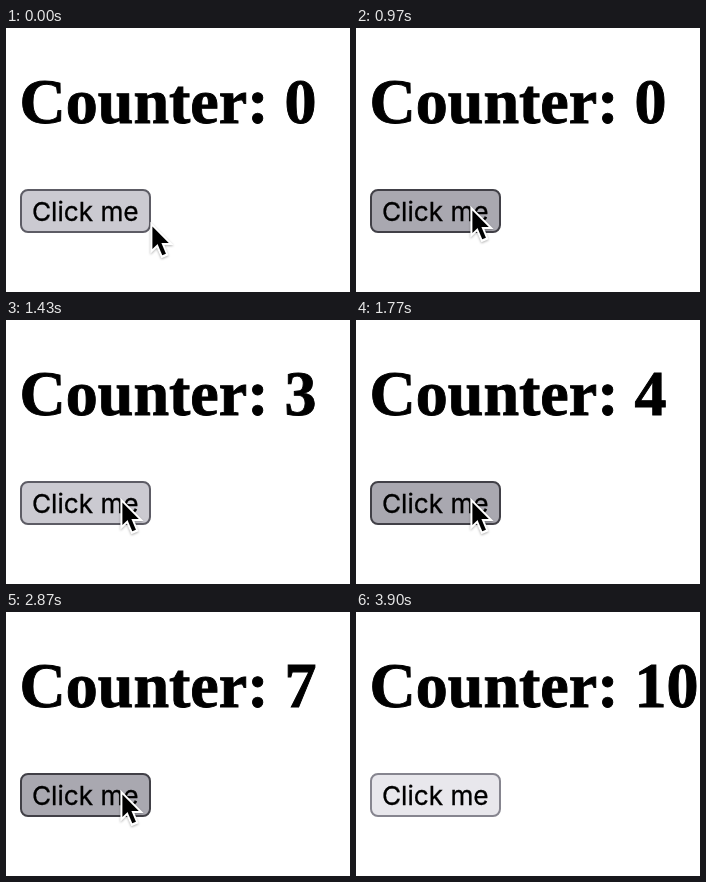
An HTML page for the animation above (4360 ms loop, 344 px wide and 264 px high).

```html
<!DOCTYPE html>
<html lang="en">
<head>
<meta charset="utf-8">
<title>Counter</title>
<style>
  html, body { margin: 0; width: 100%; height: 100%; overflow: hidden; background: #fff; }
  svg { display: block; width: 344px; height: 264px; }
  #title {
    font: bold 64px "Liberation Serif", Times, serif;
    white-space: pre;
    stroke: #000;
    stroke-width: .9px;
  }
  #label {
    font: 400 26.2px Inter, sans-serif;
    stroke: #000;
    stroke-width: .3px;
  }
</style>
</head>
<body>
<svg viewBox="0 0 344 264">
  <text id="title" x="13.6" y="95">Counter: 0</text>
  <rect id="button" x="15" y="162" width="129" height="42" rx="7" stroke-width="2"/>
  <text id="label" x="79.3" y="193" text-anchor="middle">Click me</text>
  <g id="cursor" style="filter: drop-shadow(0 1px 1px rgba(0,0,0,.3))">
    <g transform="scale(2) translate(-8.2 -4.9)">
      <path fill="#fff" d="M8.2 20.9V4.9L19.8 16.5H13L12.6 16.6ZM17.3 21.6L13.7 23.1L9 12L12.7 10.5Z"/>
      <path d="M9.2 7.3V18.5L12.2 15.6L12.6 15.5H17.4Z"/>
      <rect x="12.5" y="13.6" width="2" height="8" transform="rotate(-22.77 13.5 17.6)"/>
    </g>
  </g>
</svg>
<script>
  const LOOP = 4360;
  const $ = id => document.getElementById(id);
  const title = $('title'), button = $('button'), cursor = $('cursor');

  // fill and border per button state
  const looks = {
    idle: ['#e8e7ec', '#86858f'],
    hover: ['#cbcad1', '#5d5c65'],
    press: ['#a9a8b0', '#414047']
  };

  // [time, state, count]
  const steps = [
    [0, 'hover', 0],
    [970, 'press', 0], [1070, 'hover', 1],
    [1130, 'press', 1], [1230, 'hover', 2],
    [1300, 'press', 2], [1400, 'hover', 2], [1430, 'hover', 3],
    [1530, 'press', 3], [1630, 'hover', 4],
    [1700, 'press', 4], [1800, 'hover', 4], [1830, 'hover', 5],
    [1930, 'press', 5], [2070, 'hover', 6],
    [2570, 'press', 6], [2640, 'hover', 6], [2670, 'hover', 7],
    [2870, 'press', 7], [3000, 'hover', 8],
    [3230, 'press', 8], [3330, 'hover', 9],
    [3470, 'press', 9], [3570, 'hover', 10],
    [3870, 'idle', 10]
  ];

  const moves = [70, 100, 130, 170, 200, 230];

  function cursorAt(t) {
    if (t >= 3900) return null;
    if (t >= 3870) return [129.5, 149];
    const p = moves.filter(m => t >= m).length / moves.length;
    const k = 1 - (1 - p) ** 2;
    return [144.4 - 30 * k, 193.8 - 16 * k];
  }

  function draw(t) {
    const [, state, count] = steps.findLast(s => t >= s[0]);
    const [fill, border] = looks[state];
    title.textContent = 'Counter: ' + count;
    button.setAttribute('fill', fill);
    button.setAttribute('stroke', border);
    const pos = cursorAt(t);
    cursor.style.display = pos ? '' : 'none';
    if (pos) cursor.setAttribute('transform', `translate(${pos})`);
  }

  const start = performance.now();
  function frame() {
    draw((performance.now() - start) % LOOP);
    requestAnimationFrame(frame);
  }
  frame();
</script>
</body>
</html>
```
